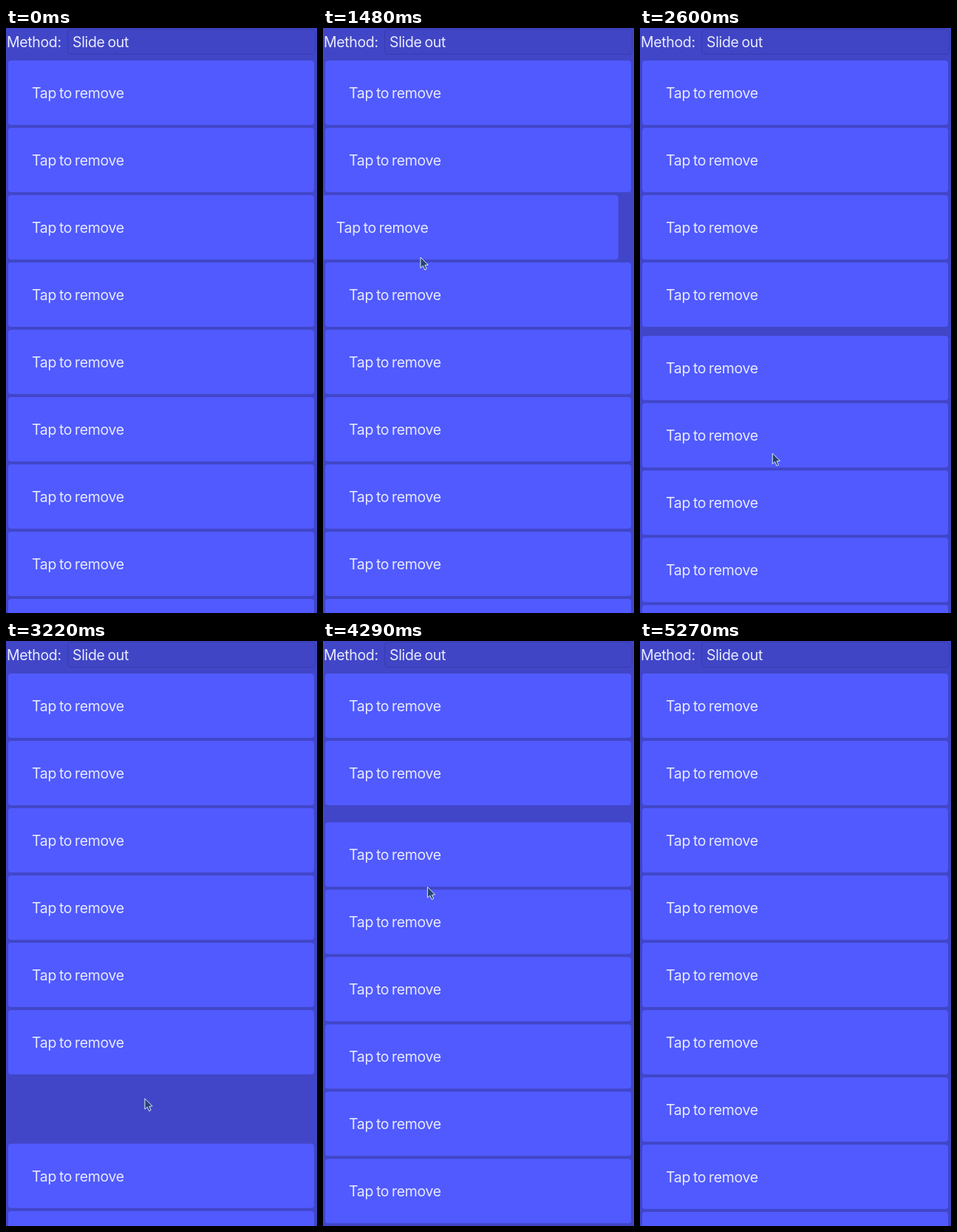
Animation, 421 px wide and 791 px high, one loop 5.58 s. Source, as an HTML page with a canvas:

```html
<!DOCTYPE html>
<html lang="en">
<head>
<meta charset="utf-8">
<title>Slide out list</title>
<style>
html, body { margin: 0; width: 100%; height: 100%; overflow: hidden; background: #4146c8; }
canvas { display: block; }
</style>
</head>
<body>
<canvas id="stage" width="421" height="791"></canvas>
<script>
const W = 421, H = 791, LOOP = 5580;
const ROW = { x: 3, y: 44, w: 414, h: 87, pitch: 91, count: 10 };
const PHASE = 220; // length of the slide, then of the fold
const GLIDE = 600; // longest pointer move between two stops

// pointer stops; the row under the pointer is removed at the tap time
const stops = [
  { at: 60, y: 792 },
  { at: 440, y: 450, tap: 450 },
  { at: 1100, y: 310, tap: 1454 },
  { at: 2200, y: 482, tap: 2202 },
  { at: 2842, y: 626, tap: 2985 },
  { at: 3768, y: 292, tap: 3916 },
  { at: 4692, y: 450, tap: 4695 },
  { at: 5270, y: 792 }
];

const ctx = document.getElementById("stage").getContext("2d");
const clamp = v => Math.min(1, Math.max(0, v));
const ease = v => { const u = clamp(v); return u * u * (3 - 2 * u); };

function box(x, y, w, h, r) {
  ctx.beginPath();
  ctx.roundRect(x, y, w, h, r);
}

function label(text, x, y) {
  ctx.fillStyle = "#e8eaff";
  ctx.font = '19.5px Inter, "Liberation Sans", sans-serif';
  ctx.letterSpacing = "-0.35px";
  ctx.wordSpacing = "-1.2px";
  ctx.fillText(text, x, y);
}

function header() {
  label("Method:", 1, 26);
  box(83.5, 1.5, 335, 34, 4.5);
  ctx.fillStyle = "#4045c5";
  ctx.fill();
  ctx.strokeStyle = "#373bae";
  ctx.lineWidth = 1;
  ctx.stroke();
  label("Slide out", 90, 26);
}

function card(x, y) {
  box(x, y, ROW.w, ROW.h, 4);
  ctx.fillStyle = "#505aff";
  ctx.fill();
  label("Tap to remove", x + 32, y + 51);
}

function list(t) {
  const stop = stops.find(s => t >= s.tap && t < s.tap + 2 * PHASE);
  const gone = stop ? Math.floor((stop.y - ROW.y) / ROW.pitch) : ROW.count;
  const time = stop ? (t - stop.tap) / PHASE : 0;
  ctx.save();
  ctx.beginPath();
  ctx.rect(1, 40, W - 3, H);
  ctx.clip();
  for (let i = 0; i < ROW.count; i++) {
    const slide = i === gone ? ease(time) * (ROW.w + 2) : 0;
    const fold = i > gone ? ease(time - 1) * ROW.pitch : 0;
    card(ROW.x - slide, ROW.y + i * ROW.pitch - fold);
  }
  ctx.restore();
}

function pointer(t) {
  const n = stops.findIndex(s => s.at > t);
  if (n < 1) return;
  const a = stops[n - 1], b = stops[n];
  const span = Math.min(GLIDE, b.at - a.at);
  const y = a.y + (b.y - a.y) * ease(1 - (b.at - t) / span);
  // the hand moves along a slope and drifts slowly to the right
  const x = 76.3 + 0.17 * y + 0.002 * t;
  ctx.save();
  ctx.translate(x, y);
  ctx.beginPath();
  [[0, 0], [0, 14.5], [3.4, 11.5], [5.8, 17], [8.3, 15.8], [6, 10.7], [10.3, 10.3]]
    .forEach(p => ctx.lineTo(...p));
  ctx.closePath();
  ctx.fillStyle = "#24466f";
  ctx.fill();
  ctx.strokeStyle = "#dfe6f5";
  ctx.lineWidth = 1;
  ctx.lineJoin = "round";
  ctx.stroke();
  ctx.restore();
}

const start = performance.now();

function draw() {
  const t = Math.max(0, performance.now() - start) % LOOP;
  ctx.fillStyle = "#4146c8";
  ctx.fillRect(0, 0, W, H);
  header();
  list(t);
  pointer(t);
  requestAnimationFrame(draw);
}
draw();
</script>
</body>
</html>
```
